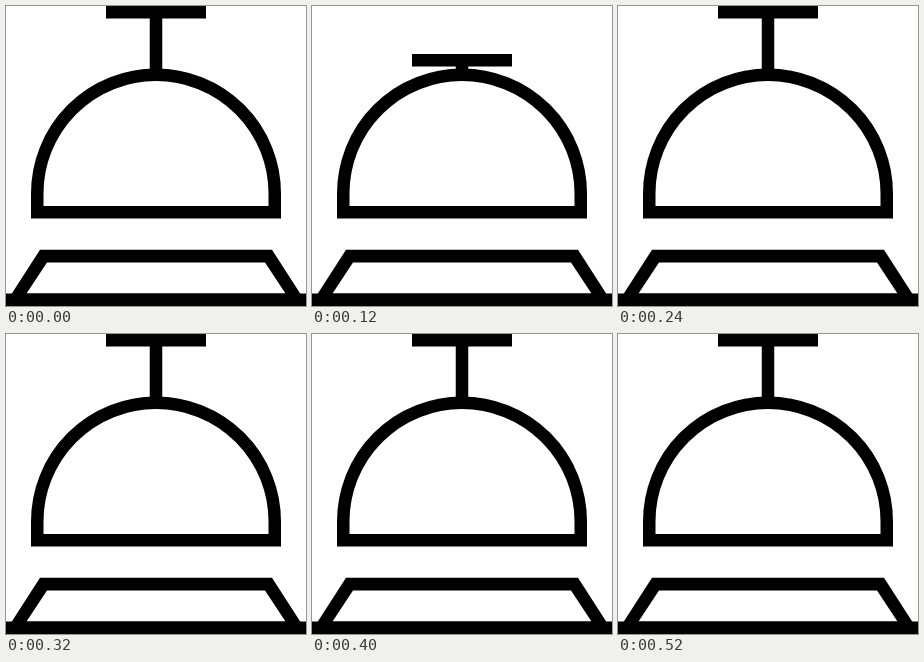
An HTML page with a canvas for the animation above (0.88 s loop, 300x300 px).

```html
<!DOCTYPE html>
<html lang="en">
<head>
<meta charset="utf-8">
<title>Desk bell</title>
<style>
  html, body { margin: 0; width: 100%; height: 100%; overflow: hidden; background: #fff; }
  canvas { display: block; width: 300px; height: 300px; }
</style>
</head>
<body>
<canvas id="stage" width="300" height="300"></canvas>
<script>
const ctx = document.getElementById('stage').getContext('2d');
const LOOP = 880, STEP = 40, LINE = 12.5;
const TILT = 15 * Math.PI / 180;

// Straight-line interpolation through [time, value] keys.
function tween(keys, t) {
  const i = keys.findIndex(key => key[0] > t);
  if (i < 0) return keys[keys.length - 1][1];
  if (i === 0) return keys[0][1];
  const [t0, v0] = keys[i - 1], [t1, v1] = keys[i];
  return v0 + (v1 - v0) * (t - t0) / (t1 - t0);
}

const press = [[0, 0], [120, 48], [240, 0]];
const swing = [[360, TILT], [440, -TILT], [520, 0]];

function polygon(points, color) {
  ctx.fillStyle = color;
  ctx.beginPath();
  points.forEach(([x, y]) => ctx.lineTo(x, y));
  ctx.fill();
}

function drawButton(drop) {
  ctx.fillStyle = '#000';
  ctx.fillRect(100, drop, 100, LINE);
  ctx.fillRect(150 - LINE / 2, drop, LINE, 68);
}

function drawDome(angle) {
  ctx.save();
  ctx.translate(150, 150);
  ctx.rotate(angle);
  ctx.beginPath();
  ctx.arc(0, 37.5, 118.75, Math.PI, 0);
  ctx.lineTo(118.75, 56.25);
  ctx.lineTo(-118.75, 56.25);
  ctx.closePath();
  ctx.fillStyle = '#fff';
  ctx.fill();
  ctx.strokeStyle = '#000';
  ctx.lineWidth = LINE;
  ctx.stroke();
  ctx.restore();
}

function drawBase() {
  polygon([[34, 243.75], [266, 243.75], [294.5, 288], [5.5, 288]], '#000');
  polygon([[41, 256.5], [259, 256.5], [279.5, 287.5], [20.5, 287.5]], '#fff');
  ctx.fillStyle = '#000';
  ctx.fillRect(0, 287.5, 300, LINE);
}

function draw(now) {
  const t = Math.floor((now % LOOP) / STEP) * STEP;
  ctx.fillStyle = '#fff';
  ctx.fillRect(0, 0, 300, 300);
  drawBase();
  drawButton(tween(press, t));
  drawDome(t < 360 ? 0 : tween(swing, t));
}

let start;
function loop(now) {
  start ??= now;
  draw(now - start);
  requestAnimationFrame(loop);
}
draw(0);
requestAnimationFrame(loop);
</script>
</body>
</html>
```
